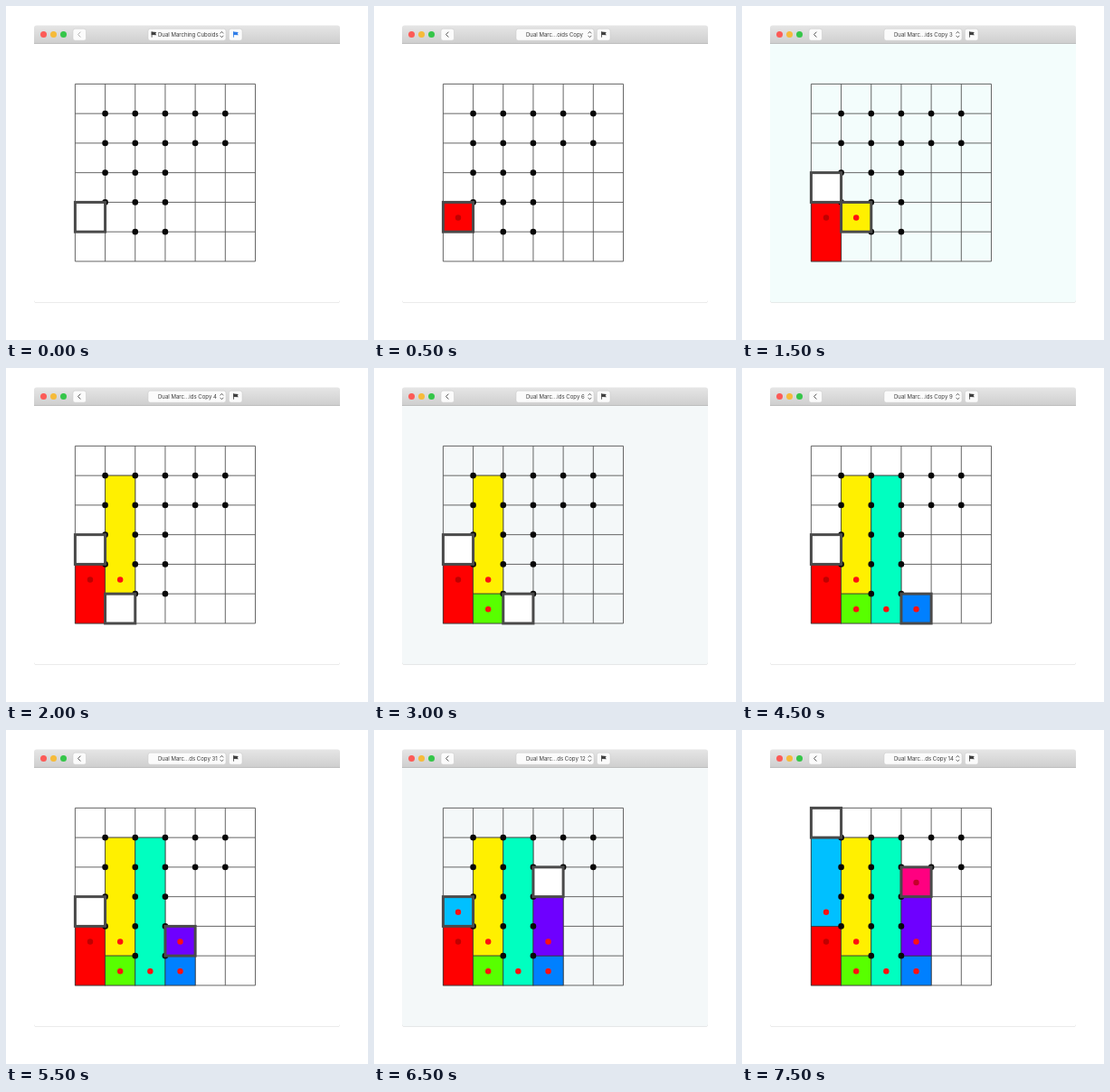
Recreate the animation shown at these times as an HTML page with a canvas. Size 400 by 370 pixels, loop 8000 ms.

```html
<!DOCTYPE html>
<html lang="en">
<head>
<meta charset="utf-8">
<title>Dual Marching Cuboids</title>
<style>
html, body { margin: 0; width: 100%; height: 100%; overflow: hidden; background: #fff; }
canvas { display: block; width: 400px; height: 370px; }
</style>
</head>
<body>
<canvas id="stage"></canvas>
<script>
const canvas = document.getElementById('stage');
const ctx = canvas.getContext('2d');
const scale = window.devicePixelRatio || 1;
canvas.width = 400 * scale;
canvas.height = 370 * scale;

const STEP = 500, STEPS = 16;
const gx = c => 76.4 + c * 33.18;
const gy = r => 86.4 + r * 32.75;

// Each cuboid is seeded in one cell, then grows upwards or downwards.
const cuboids = [
  { col: 0, seed: 4, top: 4, rows: 2, at: 1, color: '#ff0000', dot: '#c00000' },
  { col: 1, seed: 4, top: 1, rows: 4, at: 3, color: '#fff000' },
  { col: 1, seed: 5, top: 5, rows: 1, at: 5, color: '#58ff00' },
  { col: 2, seed: 5, top: 1, rows: 5, at: 7, color: '#00ffc0' },
  { col: 3, seed: 5, top: 5, rows: 1, at: 9, color: '#0080ff' },
  { col: 3, seed: 4, top: 3, rows: 2, at: 11, color: '#6e00ff' },
  { col: 0, seed: 3, top: 1, rows: 3, at: 13, color: '#00c0ff' },
  { col: 3, seed: 2, top: 2, rows: 1, at: 15, color: '#ff0080', dot: '#c4002a' }
];

// Candidate cells: column, row, first step, step at which they vanish.
const boxes = [
  [0, 4, 0, 2], [0, 3, 2, 14], [1, 4, 2, 4], [1, 5, 4, 6], [2, 5, 6, 8],
  [3, 5, 8, 10], [3, 4, 10, 12], [3, 2, 12, 16], [0, 0, 14, 16]
];

const dotCols = { 1: [1, 5], 2: [1, 5], 3: [1, 3], 4: [1, 3], 5: [2, 3] };
const tints = { 3: '#f3fdfc', 6: '#f4f8f9', 13: '#f4f8f9' };

function title(step) {
  if (step === 0) return 'Dual Marching Cuboids';
  if (step === 1) return 'Dual Marc...oids Copy';
  const n = step === 11 ? 31 : step > 11 ? step - 1 : step;
  return `Dual Marc...${n > 9 ? 'ds' : 'ids'} Copy ${n}`;
}

function disc(x, y, r, color) {
  ctx.fillStyle = color;
  ctx.beginPath();
  ctx.arc(x, y, r, 0, Math.PI * 2);
  ctx.fill();
}

function panel(x, y, w, h, r, fill, stroke) {
  ctx.beginPath();
  ctx.roundRect(x, y, w, h, r);
  ctx.fillStyle = fill;
  ctx.fill();
  if (stroke) {
    ctx.strokeStyle = stroke;
    ctx.lineWidth = 0.5;
    ctx.stroke();
  }
}

function path(points, color, width) {
  ctx.beginPath();
  points.forEach(([x, y], i) => i ? ctx.lineTo(x, y) : ctx.moveTo(x, y));
  ctx.strokeStyle = color;
  ctx.lineWidth = width;
  ctx.stroke();
}

function flag(x, y, color) {
  ctx.fillStyle = color;
  ctx.fillRect(x, y, 0.8, 6.4);
  ctx.beginPath();
  ctx.moveTo(x, y + 0.3);
  ctx.lineTo(x + 5.6, y + 0.7);
  ctx.lineTo(x + 4.5, y + 2.3);
  ctx.lineTo(x + 5.6, y + 4);
  ctx.lineTo(x, y + 3.8);
  ctx.fill();
}

function drawWindow(step) {
  panel(31, 22, 338, 307, 3, '#d8d8d8');
  panel(31, 22, 338, 306.5, 3, tints[step] || '#fff');

  const bar = ctx.createLinearGradient(0, 22, 0, 42);
  bar.addColorStop(0, '#e5e5e5');
  bar.addColorStop(1, '#cecece');
  panel(31, 21.5, 338, 20, [3, 3, 0, 0], bar);
  ctx.fillStyle = '#b4b4b4';
  ctx.fillRect(31, 41, 338, 0.8);

  ['#fc5b57', '#f6bb3a', '#35c649'].forEach((c, i) => disc(41.5 + i * 11, 31.6, 3.5, c));

  panel(74, 25.2, 14.5, 13, 2.5, '#fbfbfb', '#c4c4c4');
  panel(157, 25.2, 86, 13, 2.5, '#fbfbfb', '#c4c4c4');
  panel(246.3, 25.2, 14.7, 13, 2.5, '#fbfbfb', '#c4c4c4');
  path([[82.4, 28.7], [79.6, 31.6], [82.4, 34.5]], step ? '#444' : '#aaa', 0.9);
  path([[236.6, 30.4], [238.4, 28.4], [240.2, 30.4]], '#555', 0.9);
  path([[236.6, 32.8], [238.4, 34.8], [240.2, 32.8]], '#555', 0.9);
  flag(251.2, 28.3, step ? '#404040' : '#2f7de8');
  if (!step) flag(160.7, 28.3, '#404040');

  ctx.fillStyle = '#3c3c3c';
  ctx.font = '6.05px Inter, Roboto, sans-serif';
  ctx.textBaseline = 'alphabetic';
  ctx.fillText(title(step), 168, 33.8);
}

function drawGrid() {
  for (let i = 0; i <= 6; i++) {
    path([[gx(i), gy(0)], [gx(i), gy(6)]], '#555', 0.9);
    path([[gx(0), gy(i)], [gx(6), gy(i)]], '#555', 0.9);
  }
}

function drawCuboid(c, step) {
  const grown = step > c.at;
  const top = grown ? c.top : c.seed;
  const rows = grown ? c.rows : 1;
  const x = gx(c.col), y = gy(top);
  const w = gx(c.col + 1) - x, h = gy(top + rows) - y;
  ctx.fillStyle = c.color;
  ctx.fillRect(x, y, w, h);
  ctx.strokeStyle = 'rgba(50,50,50,.8)';
  ctx.lineWidth = 0.9;
  ctx.strokeRect(x, y, w, h);
}

function drawBox([col, row, from, to], step, active) {
  if (step < from || step >= to) return;
  const x = gx(col), y = gy(row);
  const w = gx(col + 1) - x, h = gy(row + 1) - y;
  const seeded = active.find(c => c.col === col && c.seed === row);
  ctx.fillStyle = seeded ? seeded.color : '#fff';
  ctx.fillRect(x, y, w, h);
  ctx.strokeStyle = '#4a4a4a';
  ctx.lineWidth = 3;
  ctx.strokeRect(x, y, w, h);
}

function draw(step) {
  ctx.setTransform(scale, 0, 0, scale, 0, 0);
  ctx.fillStyle = '#fff';
  ctx.fillRect(0, 0, 400, 370);
  drawWindow(step);
  drawGrid();
  const active = cuboids.filter(c => step >= c.at);
  active.forEach(c => drawCuboid(c, step));
  for (const row in dotCols) {
    const [first, last] = dotCols[row];
    for (let c = first; c <= last; c++) disc(gx(c), gy(+row), 3.3, '#080808');
  }
  boxes.forEach(b => drawBox(b, step, active));
  active.forEach(c => disc(gx(c.col + 0.5), gy(c.seed + 0.52), 3.2, c.dot || '#ff1010'));
}

const start = performance.now();
function tick() {
  const time = Math.max(0, performance.now() - start);
  draw(Math.floor(time / STEP) % STEPS);
  requestAnimationFrame(tick);
}
tick();
</script>
</body>
</html>
```
